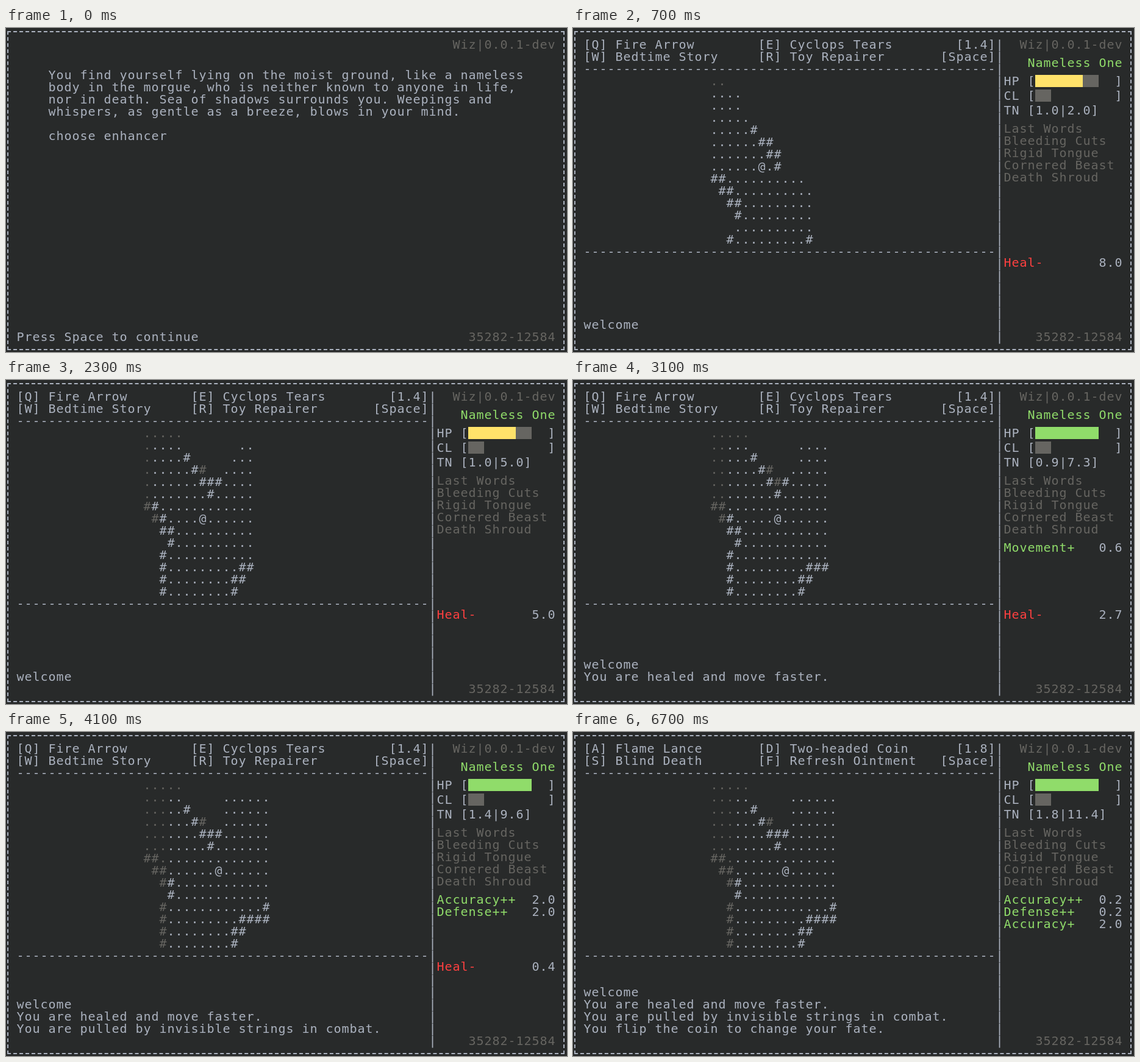
Animation, 920 px wide and 532 px high, one loop 8 s. Source, as an HTML page with a canvas:

```html
<!DOCTYPE html>
<html lang="en">
<head>
<meta charset="utf-8">
<title>Roguelike</title>
<style>
  html, body { margin: 0; width: 920px; height: 532px; overflow: hidden; background: #282a2a; }
  canvas { position: absolute; left: 2px; top: 5px; border: 2px dashed #abb2bf; }
</style>
</head>
<body>
<canvas id="screen" width="910" height="520"></canvas>
<script>
const CELL_W = 13, CELL_H = 20, COLS = 68, SIDE = 53, LOOP = 8000, SIGHT = 6;
const LIGHT = '#abb2bf', DIM = '#666561', GREEN = '#90dc6a', YELLOW = '#ffe26a', RED = '#ff4040';

const ctx = document.getElementById('screen').getContext('2d');

// The dungeon; its top left cell is MAP_X, MAP_Y.
const MAP_X = 16, MAP_Y = 1;
const dungeon = [
  '.....',
  '.....',
  '.....',
  '.....     ......',
  '.....#    ......',
  '......##  ......',
  '.......###......',
  '........#.......',
  '##..............',
  ' ##.............',
  '  ##............',
  '   #............',
  '  #............#',
  '  #.........####',
  '  #........##',
  '  #........#'
];
const cellAt = (x, y) => (dungeon[y - MAP_Y] || '')[x - MAP_X] || ' ';

const intro = [
  'You find yourself lying on the moist ground, like a nameless',
  'body in the morgue, who is neither known to anyone in life,',
  'nor in death. Sea of shadows surrounds you. Weepings and',
  'whispers, as gentle as a breeze, blows in your mind.',
  '',
  'choose enhancer'
];
const log = [
  'welcome',
  'You are healed and move faster.',
  'You are pulled by invisible strings in combat.',
  'You flip the coin to change your fate.'
];
const curses = ['Last Words', 'Bleeding Cuts', 'Rigid Tongue', 'Cornered Beast', 'Death Shroud'];
const spells = [
  ['[Q] Fire Arrow', '[E] Cyclops Tears', '[1.4]', '[W] Bedtime Story', '[R] Toy Repairer'],
  ['[A] Flame Lance', '[D] Two-headed Coin', '[1.8]', '[S] Blind Death', '[F] Refresh Ointment']
];

const combat = [['Accuracy++', '2.0'], ['Defense++', '2.0']];
const fated = [['Accuracy++', '0.2'], ['Defense++', '0.2'], ['Accuracy+', '2.0']];

// start, player x, y, turn, hp, heal curse, boosts, log length, spell page
const steps = [
  [100,  22, 7,  '0.0|1.0',  6, '9.0', [], 1, 0],
  [700,  22, 8,  '1.0|2.0',  6, '8.0', [], 1, 0],
  [1700, 22, 9,  '1.0|3.0',  6, '7.0', [], 1, 0],
  [1900, 22, 10, '1.0|4.0',  6, '6.0', [], 1, 0],
  [2300, 23, 10, '1.0|5.0',  6, '5.0', [], 1, 0],
  [2500, 23, 10, '1.4|6.4',  8, '3.6', [['Movement+', '1.5']], 2, 0],
  [3100, 24, 10, '0.9|7.3',  8, '2.7', [['Movement+', '0.6']], 2, 0],
  [3800, 25, 10, '0.9|8.2',  8, '1.8', [], 2, 0],
  [4100, 25, 10, '1.4|9.6',  8, '0.4', combat, 3, 0],
  [5300, 25, 10, '1.4|9.6',  8, '0.4', combat, 3, 1],
  [6700, 25, 10, '1.8|11.4', 8, '',    fated,  4, 1]
].map(([start, x, y, turn, hp, heal, boosts, logged, page]) =>
  ({ start, x, y, turn, hp, heal, boosts, logged, page }));

// Shadowcasting over square rings; 960 slots divide evenly for every radius.
function look(px, py) {
  const SLOTS = 960, shade = new Uint8Array(SLOTS), seen = new Set([px + ',' + py]);
  for (let r = 1; r <= SIGHT; r++) {
    for (let k = 0; k < 8 * r; k++) {
      const o = k % (2 * r) - r;
      const [dx, dy] = [[o, -r], [r, o], [-o, r], [-r, -o]][Math.floor(k / (2 * r))];
      const x = px + dx, y = py + dy, wall = cellAt(x, y) === '#';
      let open = false;
      for (let s = (2 * k - 1) * 60 / r; s < (2 * k + 1) * 60 / r; s++) {
        const slot = (s + SLOTS) % SLOTS;
        if (!shade[slot]) open = true;
        if (wall) shade[slot] = 1;
      }
      if (open) seen.add(x + ',' + y);
    }
  }
  return seen;
}

const memory = new Set();
for (const step of steps) {
  step.visible = look(step.x, step.y);
  step.visible.forEach(key => memory.add(key));
  step.known = new Set(memory);
}

function put(text, col, row, color = LIGHT) {
  ctx.fillStyle = color;
  const y = Math.round(row * CELL_H) + 7;
  [...text].forEach((ch, i) => {
    if (ch !== ' ') ctx.fillText(ch, (col + i + 1.5) * CELL_W, y);
  });
}

const putRight = (text, row, color, end = COLS) => put(text, end - text.length, row, color);

function bar(label, row, fill, color, size) {
  put(label + ' [', SIDE, row);
  put(']', COLS - 1, row);
  const x = 58 * CELL_W, y = Math.round(row * CELL_H) - 10;
  ctx.fillStyle = DIM;
  ctx.fillRect(x, y, size * CELL_W, CELL_H);
  ctx.fillStyle = color;
  ctx.fillRect(x, y, fill * CELL_W, CELL_H);
}

function drawIntro() {
  intro.forEach((line, i) => put(line, 4, 3.5 + i));
  put('Press Space to continue', 0, 25);
}

function drawMap({ x, y, visible, known }) {
  for (let i = 0; i < 14; i++) {
    const wy = y - 7 + i;
    for (let wx = MAP_X; wx < MAP_X + 16; wx++) {
      const key = wx + ',' + wy;
      if (!known.has(key)) continue;
      const ch = wx === x && wy === y ? '@' : cellAt(wx, wy);
      put(ch, wx, 4 + i, visible.has(key) ? LIGHT : DIM);
    }
  }
}

function drawSidebar({ hp, turn, heal, boosts }) {
  for (let row = 1; row <= 25; row++) put('|', SIDE - 1, row);
  putRight('Nameless One', 2.5, GREEN);
  bar('HP', 4, hp, hp < 8 ? YELLOW : GREEN, 8);
  bar('CL', 5.2, 0, DIM, 2);
  put('TN [' + turn + ']', SIDE, 6.4);
  curses.forEach((name, i) => put(name, SIDE, 7.9 + i, DIM));
  boosts.forEach(([name, left], i) => {
    put(name, SIDE, 13.4 + i, GREEN);
    putRight(left, 13.4 + i);
  });
  if (heal) {
    put('Heal-', SIDE, 18.9, RED);
    putRight(heal, 18.9);
  }
}

function drawGame(step) {
  const [a, b, cost, c, d] = spells[step.page];
  put(a, 0, 1);
  put(b, 22, 1);
  putRight(cost, 1, LIGHT, 52);
  put(c, 0, 2);
  put(d, 22, 2);
  putRight('[Space]', 2, LIGHT, 52);
  put('-'.repeat(52), 0, 3);
  put('-'.repeat(52), 0, 18);
  drawMap(step);
  drawSidebar(step);
  for (let i = 0; i < step.logged; i++) put(log[i], 0, 25 - step.logged + i);
}

function draw(step) {
  ctx.clearRect(0, 0, 910, 520);
  ctx.font = '20px "DejaVu Sans Mono", monospace';
  ctx.textAlign = 'center';
  putRight('Wiz|0.0.1-dev', 1, DIM);
  putRight('35282-12584', 25, DIM);
  if (step) drawGame(step);
  else drawIntro();
}

let shown = null;
const begin = performance.now();
function tick() {
  const t = (performance.now() - begin) % LOOP;
  const index = steps.filter(s => s.start <= t).length - 1;
  if (index !== shown) {
    shown = index;
    draw(steps[index]);
  }
  requestAnimationFrame(tick);
}
tick();
</script>
</body>
</html>
```
